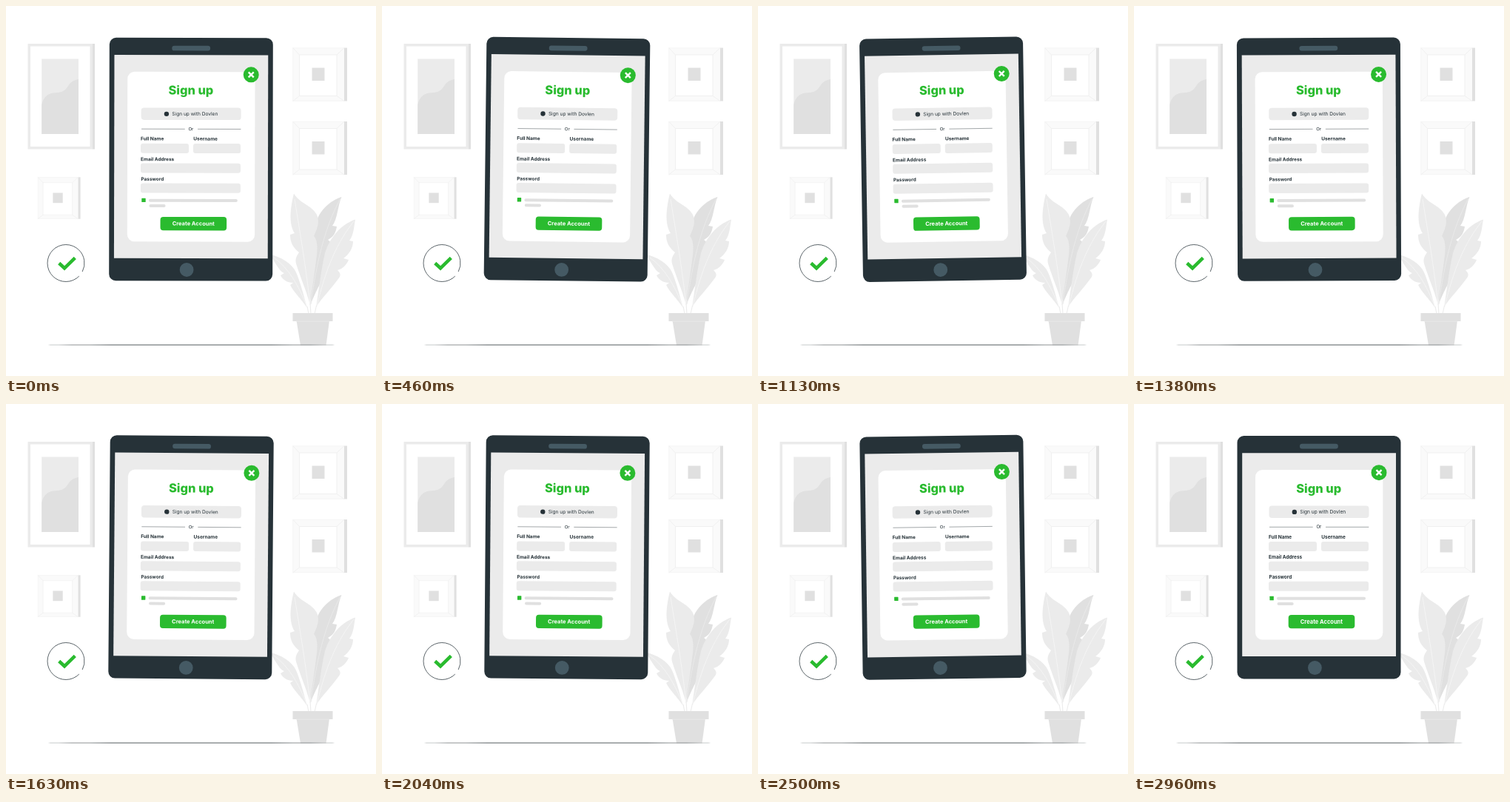
An HTML page with a canvas for the animation above (3000 ms loop, 500 px wide and 500 px high).

```html
<!DOCTYPE html>
<html lang="en">
<head>
<meta charset="utf-8">
<title>Sign up form</title>
<style>
html, body { margin: 0; width: 100%; height: 100%; overflow: hidden; background: #fff; }
canvas { display: block; width: 500px; height: 500px; }
</style>
</head>
<body>
<canvas id="stage"></canvas>
<script>
const SIZE = 500, FPS = 24, SWING = 36, LOOP = 3000;
const INK = '#263238', SLATE = '#455a64', GREEN = '#2abb2f';
const MIST = '#ebebeb', GREY = '#e0e0e0', PALE = '#fafafa';

const canvas = document.getElementById('stage');
const ctx = canvas.getContext('2d');
const ratio = window.devicePixelRatio || 1;
canvas.width = canvas.height = SIZE * ratio;

function rect(x, y, x2, y2, color, r = 0) {
  ctx.fillStyle = color;
  ctx.beginPath();
  ctx.roundRect(x, y, x2 - x, y2 - y, r);
  ctx.fill();
}

function disc(x, y, r, color) {
  ctx.fillStyle = color;
  ctx.beginPath();
  ctx.arc(x, y, r, 0, Math.PI * 2);
  ctx.fill();
}

function fill(d, color) {
  ctx.fillStyle = color;
  ctx.fill(new Path2D(d));
}

function stroke(d, color, width) {
  ctx.strokeStyle = color;
  ctx.lineWidth = width;
  ctx.stroke(new Path2D(d));
}

function label(text, x, y, size, weight = 700, color = INK, align = 'left') {
  ctx.font = `${weight} ${size}px Inter, "Open Sans", sans-serif`;
  ctx.textAlign = align;
  ctx.fillStyle = color;
  ctx.fillText(text, x, y);
}

function poster() {
  rect(29.5, 51, 117.5, 193.5, MIST);
  rect(117, 51, 120, 193.5, GREY);
  rect(33, 54.5, 113.5, 190, '#fff');
  rect(48.2, 71.5, 98, 173, MIST);
  fill('M48.2 133C51 123 56 118.500 64 117.500C73 116.500 78 117 83 109.500C87 103 91 100 98 99V173H48.200Z', GREY);
}

function smallFrame(x, y, scale) {
  ctx.save();
  ctx.translate(x, y);
  ctx.scale(scale, scale);
  rect(0, 0, 69.5, 72, PALE);
  rect(69.5, 0, 73.5, 72, GREY);
  rect(9, 9.5, 59.5, 65, '#fff');
  stroke('M0 0L9 9.500M69.500 0L59.500 9.500M0 72L9 65M69.500 72L59.500 65M9 9.500H59.500V65H9Z', '#eeeeee', 0.8);
  stroke('M.3.300H69.500M.3 0V72M0 71.700H69.500', '#f0f0f0', 0.6);
  rect(26, 27, 43, 44.5, GREY);
  ctx.restore();
}

function plant() {
  fill('M453.500 258C438 263 421 277 417 300C414 320 413 360 411.500 404C417 388 426 374 435 352C436 345 433 340 432 337C438 335 440 327 440 320L435 316C443 312 446 305 447 298L441 297C448 288 448 271 453.500 258Z', GREY);
  fill('M389 253.500C398 268 412 268 420 282C425 293 419 304 416 311C422 316 421 333 419 344C417 362 413 385 411 404C405 382 397 365 392 348C390 341 394 336 396 333C386 325 384 317 384 309L390 307C381 294 385 269 389 253.500Z', MIST);
  fill('M472 288.500C453 295 438 312 431 334C426 355 423 382 419 407C427 394 440 382 451 366C453 362 450 359 448 357C456 355 461 348 463 343L456 341C464 335 469 327 469 318L464 317C470 309 470 299 472 288.500Z', MIST);
  fill('M356 335.500C371 339 386 347 392 360C398 374 402 390 407 408C399 396 389 387 384 377L388 374C380 374 374 370 371 364L376 361C368 358 363 344 356 335.500Z', MIST);
  stroke('M390 261C397 305 405 350 411 404M470 291C447 320 432 355 420 406M362 340C383 355 396 379 407 407', '#f7f7f7', 0.8);
  stroke('M452 260C430 300 419 350 412 403', MIST, 0.8);
  stroke('M407 406L409 416M411 402L412 416M419.500 405L417 416', MIST, 1.1);
  fill('M392.500 425H437L432.500 458.500H398Z', GREY);
  rect(387.5, 415, 441.5, 426, GREY);
  stroke('M392 426.200H437', MIST, 0.8);
}

function badge() {
  ctx.strokeStyle = INK;
  ctx.lineWidth = 0.75;
  ctx.beginPath();
  ctx.arc(81, 347.5, 25, 0.78, Math.PI * 2 + 0.48);
  ctx.stroke();
  stroke('M71.700 347.500L79 354.300L93.300 340.300', GREEN, 4.6);
}

function scenery() {
  poster();
  smallFrame(387.5, 56.5, 1);
  smallFrame(387.5, 156, 1);
  smallFrame(43, 231.3, 0.784);
  plant();
  badge();
  ctx.fillStyle = '#8d9294';
  ctx.beginPath();
  ctx.ellipse(250.5, 458, 194, 0.85, 0, 0, Math.PI * 2);
  ctx.fill();
}

function form() {
  label('Sign up', 249.7, 119.5, 16.4, 800, GREEN, 'center');

  rect(182.5, 137.5, 317.5, 154, MIST, 4);
  disc(216.8, 145.9, 3.2, INK);
  label('Sign up with Dovlen', 224.2, 148, 6.6, 400);

  stroke('M183 166.300H241.700M259 166.300H317.300', '#7b8285', 0.7);
  label('Or', 249.8, 168.3, 6, 400, INK, 'center');

  label('Full Name', 182, 181.6, 6.5);
  label('Username', 253.3, 181.6, 6.5);
  label('Email Address', 182, 209.4, 6.5);
  label('Password', 182.6, 236.2, 6.4);
  rect(182, 186, 247, 199, MIST, 3);
  rect(253, 186, 317, 199, MIST, 3);
  rect(182, 212.7, 317, 225.7, MIST, 3);
  rect(182, 239.7, 317, 252.7, MIST, 3);

  rect(183.4, 259.8, 188.8, 265.2, GREEN, 0.5);
  rect(193, 260.8, 313, 264.8, GREY, 2);
  rect(193.5, 268, 215.7, 272, GREY, 2);

  rect(208.7, 285, 298.3, 303.3, GREEN, 4);
  label('Create Account', 253.4, 296.6, 7.5, 700, '#fff', 'center');
}

function tablet(angle) {
  ctx.save();
  ctx.translate(250, 207.2);
  ctx.rotate(angle * Math.PI / 180);
  ctx.translate(-250, -207.2);
  rect(139.5, 43, 360.5, 371.4, INK, 9);
  rect(224, 53.8, 275.8, 60.4, SLATE, 3.2);
  rect(146.2, 66.2, 354, 341, MIST);
  disc(244.4, 356.5, 9.4, SLATE);
  rect(164, 89, 336.3, 318.5, '#fff', 9.5);
  form();
  disc(331, 92.7, 10.5, GREEN);
  stroke('M327.500 89.200L334.500 96.200M334.500 89.200L327.500 96.200', '#fff', 2.4);
  ctx.restore();
}

// Linear swing: 0 to 1 to -1 to 0 degrees
function swing(p) {
  if (p < 0.25) return p * 4;
  if (p < 0.75) return 2 - p * 4;
  return p * 4 - 4;
}

function draw(ms) {
  const step = Math.floor((ms % LOOP) * FPS / 1000 + 0.1) + 1;
  ctx.setTransform(ratio, 0, 0, ratio, 0, 0);
  ctx.fillStyle = '#fff';
  ctx.fillRect(0, 0, SIZE, SIZE);
  scenery();
  tablet(swing((step % SWING) / SWING));
}

let start;
function tick(now) {
  start ??= now;
  draw(now - start);
  requestAnimationFrame(tick);
}
draw(0);
requestAnimationFrame(tick);
</script>
</body>
</html>
```
